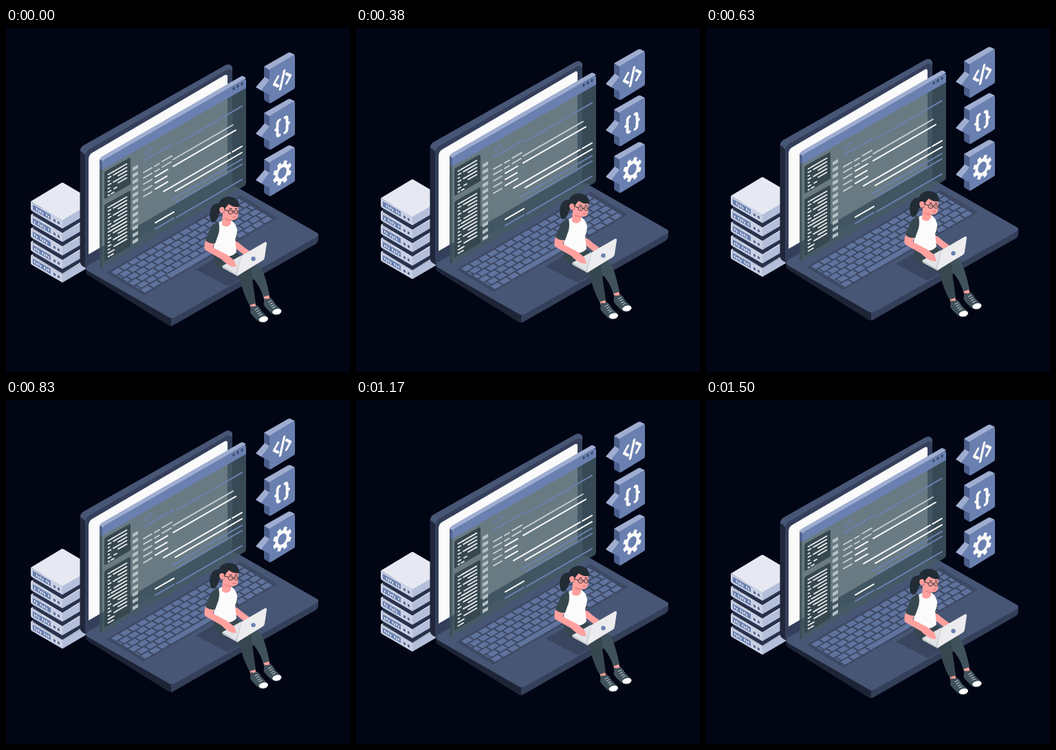
An HTML page with a canvas for the animation above (1.54 s loop, 500x500 px).

```html
<!DOCTYPE html>
<html lang="en">
<head>
<meta charset="utf-8">
<title>Coding scene</title>
<style>
html, body { margin: 0; width: 100%; height: 100%; overflow: hidden; background: #010514; }
canvas { display: block; }
</style>
</head>
<body>
<canvas id="stage" width="500" height="500"></canvas>
<script>
const ctx = document.getElementById('stage').getContext('2d');
const LOOP = 1540, STEP = 1000 / 24, SLOPE = Math.tan(Math.PI / 6);
const BLUE = '#6a80b0', PALE = '#9eadd0', SLATE = '#475675', INK = '#37474f';
const WHITE = '#fafafa', SKIN = '#ffa19f', HAIR = '#222c34';

function fill(color, path) {
  ctx.fillStyle = color;
  ctx.fill(new Path2D(path));
}

function stroke(color, width, path) {
  ctx.strokeStyle = color;
  ctx.lineWidth = width;
  ctx.stroke(new Path2D(path));
}

function oval(color, x, y, rx, ry, tilt = 0) {
  ctx.fillStyle = color;
  ctx.beginPath();
  ctx.ellipse(x, y, rx, ry, tilt, 0, Math.PI * 2);
  ctx.fill();
}

// Line along the rising isometric axis
function rise(color, width, x1, y1, x2) {
  stroke(color, width, `M${x1} ${y1}L${x2} ${y1 - (x2 - x1) * SLOPE}`);
}

// Run a drawing in a plane skewed by the given slope
function skewed(x, y, slope, draw) {
  ctx.save();
  ctx.transform(1, slope, 0, 1, x, y);
  draw();
  ctx.restore();
}

function drawServers() {
  for (let i = 4; i >= 0; i--) {
    const y = 252 + i * 19.6;
    if (i < 4) fill('#28324d', `M39 ${y + 11}L82 ${y + 37}L126 ${y + 11}V${y + 19}L82 ${y + 46}L39 ${y + 20}Z`);
    fill('#e6e9f2', `M36 ${y}L80 ${y - 26.5}Q82 ${y - 28} 84 ${y - 26.5}L129 ${y}L82 ${y + 27}Z`);
    fill('#c9d0e4', `M36 ${y}L82 ${y + 27}V${y + 39.5}L38 ${y + 14}Q36 ${y + 13} 36 ${y + 11}Z`);
    fill('#b4bfdb', `M82 ${y + 27}L129 ${y}V${y + 12}L82 ${y + 39.5}Z`);
    skewed(39, y + 4.5, SLOPE, () => {
      fill(BLUE, 'M0 0H26V7.5H0Z');
      for (let k = 0; k < 8; k++) {
        const gap = (k * 3 + i * 2) % 5;
        if (gap) fill('#e6e9f2', `M${2 + k * 2.9} ${gap > 2 ? 2 : 3}h1.5v3.5h-1.5Z`);
      }
      oval('#4c5d86', 31.5, 5, 1.6, 1.9);
      oval('#4c5d86', 37.5, 5, 1.6, 1.9);
    });
  }
}

function drawLid() {
  fill('#20273b', 'M107.5 180Q107 174 112 171L319 54Q326 51 329 57V228L117 349Q107.5 346 107.5 339Z');
  fill('#343f5b', 'M115 186Q115 180 120 177L321 61Q329 57 329 65V228L115 349Z');
  fill(SLATE, 'M108 179Q108 174 112 171L319 54Q326 51 329 57V63Q326 58 321 61L120 177Q116 180 115 185Q112 180 108 179Z');
  fill(WHITE, 'M120 192Q120 184.5 125 181.5L317 69Q322 66 322 71V212L120 329Z');
}

function drawKeys() {
  ctx.save();
  ctx.transform(187, -108, 51, 31, 152, 354);
  fill('#3e4964', 'M-.025 -.03H1.02V1.03H-.025Z');
  ctx.fillStyle = '#5f739d';
  const rows = 6, cols = 15;
  for (let r = 0; r < rows; r++) {
    const shift = r && r < 5 ? (r % 3) * 0.018 : 0;
    for (let c = 0; c < cols; c++) {
      if (r === 5 && c > 2 && c < 8) continue;
      const x = c / cols + shift;
      const w = Math.min(0.055, 0.99 - x);
      if (w > 0) ctx.fillRect(x, r / rows + 0.02, w, 0.13);
    }
    if (shift) ctx.fillRect(0, r / rows + 0.02, shift - 0.01, 0.13);
  }
  ctx.fillRect(0.2, 5 / rows + 0.02, 0.32, 0.13);
  ctx.restore();
}

function drawBase() {
  fill('#1d2436', 'M116 346V354Q116 357 119 359L236 432Q239 433.5 242 433V418Z');
  fill('#343f5a', 'M240 419V433Q242 433 245 431L450 314Q454 311 454 307V299Z');
  fill(SLATE, 'M119 345L325 232Q331 228 337 232L451 297Q457 300 451 304L246 420Q241 423 236 420L119 353Q114 349 119 345Z');
  drawKeys();
  fill('#3a455f', 'M276 351L306 333L352 359L322 375Z');
}

function drawSidebar(top, bottom, rows) {
  fill('#37474f', `M143 ${top + 2}Q143 ${top} 145 ${top - 1}L179 ${top - 20}Q181 ${top - 21} 181 ${top - 18}V${bottom - 22}L145 ${bottom - 1}Q143 ${bottom} 143 ${bottom - 2}Z`);
  for (let i = 0; i < rows; i++) {
    const y = top + 4 + i * 5.1;
    const indent = [0, 4, 7, 4, 9, 5, 1][i % 7];
    rise('#e8ecee', 1.8, 148.5, y, 150.5 + i % 2 * 2);
    if (indent < 6) rise('#e8ecee', 1.8, 152 + indent, y - 2 - indent * SLOPE, 156 + indent);
    const start = 156 + Math.min(indent, 7);
    if (i < rows - 2) rise('#e8ecee', 1.8, start, y - (start - 148.5) * SLOPE, 175.5);
  }
}

function drawCode() {
  for (let i = 0; i < 12; i++) {
    const y = 202 + i * 9.65;
    fill('#b5bfc2', `M184 ${y + 1}L192 ${y - 3.6}V${y + 1.4}L184 ${y + 6}Z`);
  }
  skewed(207, 179, -SLOPE, () => {
    stroke(BLUE, 1.3, 'M-3 -3L-6 0L-3 3M1.5 -6L-1.5 6M3 -3L6 0L3 3');
  });
  const soft = '#c4cdd4';
  [[200, 193, 243], [248, 168.5, 343], [240, 250, 343], [248, 253, 343], [217, 292, 244], [248, 275, 343]]
    .forEach(([x, y, end]) => rise(BLUE, 2, x, y, end));
  [[200, 210, 212], [216, 201, 223], [227, 194, 241], [243, 191, 330],
   [200, 218, 212], [216, 209, 223], [227, 202, 240],
   [200, 227, 212], [200, 236, 212], [200, 245, 212]]
    .forEach(([x, y, end]) => rise(soft, 1.9, x, y, end));
  [[243, 201, 334], [217, 216, 235], [217, 225, 234], [217, 234, 235],
   [229, 237.5, 326], [329, 180, 343], [246, 237, 343], [217, 283, 244]]
    .forEach(([x, y, end]) => rise(WHITE, 2, x, y, end));
}

function drawWindow() {
  fill('rgba(69,90,100,.8)', 'M136 204L349 85V224Q349 228 346 230L141 347Q136 349 136 344Z');
  fill('rgba(55,71,79,.55)', 'M136 204L140 206V347Q136 349 136 344Z');
  fill(PALE, 'M136 192Q136 189 139 187L342 70Q345 69 349 73L140 194Z');
  fill('#52658f', 'M136 191L140 193V206L136 204Z');
  fill(BLUE, 'M140 195Q140 193 143 191L345 75Q349 73 349 77V87L140 206Z');
  [331, 337, 343].forEach((x, i) => oval('#3d4c70', x, 88 - i * 3.4, 1.6, 2.5, 0.3));
  drawSidebar(209, 249, 7);
  drawSidebar(257, 339, 15);
  drawCode();
}

function drawBrackets() {
  stroke(WHITE, 3.6, 'M-6 -8L-12 0L-6 6M3 -12L-3 12M6 -6L12 0L6 8');
}

function drawBraces() {
  stroke(WHITE, 4, 'M-4 -11Q-7 -11 -7 -7V-3Q-7 0 -9.5 0Q-7 0 -7 3V7Q-7 11 -4 11M4 -11Q7 -11 7 -7V-3Q7 0 9.5 0Q7 0 7 3V7Q7 11 4 11');
}

function drawGear() {
  ctx.scale(0.84, 1.04);
  for (let i = 0; i < 8; i++) {
    ctx.save();
    ctx.rotate((i + 0.5) * Math.PI / 4);
    fill(WHITE, 'M-3.6 -9L-2.8 -16H2.8L3.6 -9Z');
    ctx.restore();
  }
  oval(WHITE, 0, 0, 12, 12);
  oval(BLUE, 0, 0, 7.4, 7.4);
}

function drawBubble(y, icon) {
  ctx.save();
  ctx.translate(0, y);
  fill('#4b5d89', 'M375 56L384 60V110L377 106Q375 105 375 103Z');
  fill(PALE, 'M375 56L410 36Q412 35 414 36L420 39L383 61Z');
  fill(BLUE, 'M383 62Q383 60 385 59L417 40Q420 38.5 420 42V86Q420 88 418 89L386 108.5Q383 110 383 107Z');
  fill('#4b5d89', 'M363 86L371 90L383 96V91L372 86Z');
  fill(BLUE, 'M371 91L383 76V97Z');
  fill(PALE, 'M363 86L376 71L383 75.5L371 91Z');
  skewed(401.5, 75.5, -0.5, icon);
  ctx.restore();
}

function drawShoe(x, y) {
  ctx.save();
  ctx.translate(x, y);
  fill('#1f2a31', 'M0 8Q0 12 4 16L10 23Q16 27 23 25L25 22L14 16Z');
  fill('#40525b', 'M1 1Q6 3 10 0Q14 3 17 9L25 17Q25 21 18 20L12 22Q3 16 0 10Z');
  fill('#ffffff', 'M12.5 21Q14 17 20 16Q26 16 26 20Q24 25 17 24.5Q13 24 12.5 21Z');
  stroke('#e8edf0', 0.9, 'M7 6.5L11 4.5M9 9.5L13 7.5M11 12.5L15 10.5M13 15L17 13');
  ctx.restore();
}

function drawLegs() {
  fill(SKIN, 'M353 398L361 396L364 406L356 408ZM373 387L381 385L384 394L376 397Z');
  drawShoe(355, 403);
  drawShoe(374.5, 392);
  fill('#40525b', 'M335 334Q362 336 371 349Q377 360 383 388L374 391Q369 374 356 360L338 355Z');
  fill(INK, 'M302 328L334 325L352 343Q358 351 358 365L363 400L354 403Q343 383 340 363Q325 355 309 348Q301 340 302 328Z');
}

function drawHead() {
  fill(HAIR, 'M312 255Q301 253 297 264Q294 277 300 283Q307 281 309 272L315 264Z');
  fill(SKIN, 'M315 267L314 286Q322 292 327 284V276Z');
  fill('#ed8785', 'M316 276Q322 281 327 280V277Z');
  fill(SKIN, 'M314 257L335 253Q338 259 338 265L337 274Q335 280 328 279Q319 277 315 270Z');
  fill(HAIR, 'M312 268Q306 257 312 250Q321 242 332 247Q339 250 339 260Q330 261 324 256Q320 259 318 264L317 269Z');
  oval(SKIN, 314, 264.5, 3.7, 4.4, -0.2);
  stroke('#ed8785', 0.8, 'M313 263Q316 264 314 267');
  stroke(HAIR, 1, 'M317 264L323 266M330 267H332M328 262.5L325 262.5M333 262.5H335.5');
  ctx.strokeStyle = HAIR;
  ctx.lineWidth = 0.9;
  [[326.5, 3.4], [334.5, 2.8]].forEach(([x, r]) => {
    ctx.beginPath();
    ctx.ellipse(x, 267.3, r, 3.1, 0, 0, Math.PI * 2);
    ctx.stroke();
    oval(HAIR, x + 0.5, 267, 0.6, 0.8);
  });
  stroke('#b75558', 0.9, 'M330 275Q332 276 334 274');
}

function drawWoman() {
  drawLegs();
  fill(SKIN, 'M331 308Q338 311 344 317L355 325Q352 330 346 330L332 319Z');
  fill(INK, 'M326 282Q334 284 336 293L336 306L329 309Z');
  fill('#fbfbfb', 'M307 284L314 280Q321 291 326 279Q334 283 336 293Q336 301 333 307L335 326Q325 336 310 330Q302 327 302 320L304 301Z');
  fill(SKIN, 'M314 280Q321 295 326 279L322 277Z');
  drawHead();
  fill('#e2e4e7', 'M314 346L341 331L369 340L337 360Z');
  fill('#c3c8cf', 'M314 346L337 359V361L315 349Z');
  fill(SKIN, 'M291 306Q286 319 290 323L313 336Q319 343 329 347L335 347L332 338L322 330L301 319L303 309Z');
  fill(INK, 'M309 282Q299 284 296 293L290 309Q296 314 304 313L309 299Q311 290 309 282Z');
  fill('#c7cbd1', 'M334 358L342 331L377 311L379 313L338 360Z');
  fill('#ececee', 'M336 358L342 333Q343 330 346 329L376 311.5Q379 310 379 313L376 333Q376 336 373 338L339 358Q335 360 336 358Z');
  oval(BLUE, 359.5, 335.5, 3.2, 3.2);
}

function drawScene() {
  drawServers();
  drawLid();
  drawBase();
  drawWindow();
  drawBubble(0, drawBrackets);
  drawBubble(67.4, drawBraces);
  drawBubble(135, drawGear);
  drawWoman();
}

// Constant-speed bob, lowest just before the loop ends
function bobAt(time) {
  const held = Math.floor((time + 4) / STEP) * STEP;
  const phase = ((held - 1510 + LOOP) % LOOP + LOOP) % LOOP / LOOP;
  return 0.4 - 10 * (1 - Math.abs(1 - 2 * phase));
}

function frame(now) {
  ctx.setTransform(1, 0, 0, 1, 0, 0);
  ctx.fillStyle = '#010514';
  ctx.fillRect(0, 0, 500, 500);
  ctx.translate(0, bobAt((now - start) % LOOP));
  ctx.lineCap = 'round';
  ctx.lineJoin = 'round';
  drawScene();
  requestAnimationFrame(frame);
}

const start = performance.now();
frame(start);
</script>
</body>
</html>
```
